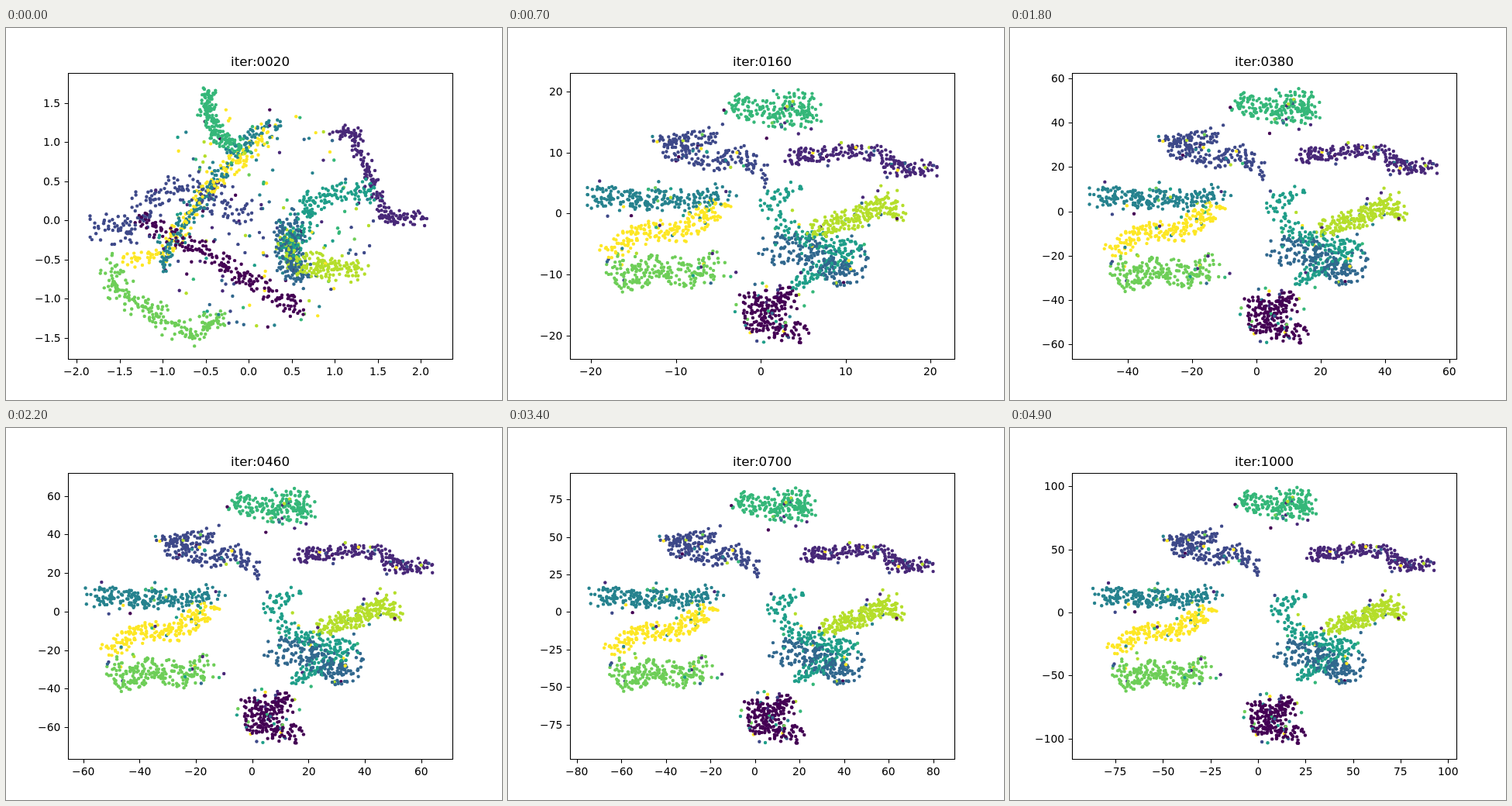
An HTML page that plays this animation: 640 by 480 pixels, repeating every 5 s.

```html
<!DOCTYPE html>
<html lang="en">
<head>
<meta charset="utf-8">
<title>Embedding</title>
<style>
html, body { margin: 0; width: 100%; height: 100%; overflow: hidden; background: #fff; }
svg { display: block; width: 640px; height: 480px; }
text { font: 13.89px "DejaVu Sans", sans-serif; fill: #000; }
#title { font-size: 16.67px; text-anchor: middle; }
#axes path { fill: none; stroke: #000; stroke-width: 1.11; }
</style>
</head>
<body>
<svg viewBox="0 0 640 480">
  <g id="dots"></g>
  <g id="axes">
    <path d="M80.5 58.5H576.5V427.5H80.5Z"/>
    <path id="ticks"/>
    <g id="labels"></g>
  </g>
  <text id="title" x="328" y="49"></text>
</svg>
<script>
const STEP_MS = 100, STEPS = 50, PER_CLASS = 220, STRAY = 0.07;
const SETTLED = 160, LAST = 1000;
const BOX = { left: 80, right: 576, top: 57.6, bottom: 427.2 };
const CENTRE = [328, 242];
const NS = "http://www.w3.org/2000/svg";
const $ = id => document.getElementById(id);

// Each class is a cloud of radius w around a spine: first scattered, then settled.
const cloud = (w, ...spine) => ({ w, spine });
const classes = [
  { color: "#440154",
    start: cloud(15, [168, 240], [220, 272], [325, 330], [380, 366]),
    end: cloud(13, [308, 366], [364, 359], [322, 384], [372, 398]) },
  { color: "#482878",
    start: cloud(11, [425, 134], [448, 135], [490, 245], [545, 246]),
    end: cloud(9, [385, 164], [455, 157], [488, 160], [497, 176], [546, 179]) },
  { color: "#3e4989",
    start: cloud(24, [115, 257], [165, 265], [190, 215], [250, 205], [320, 250]),
    end: cloud(11, [264, 137], [206, 150], [265, 170], [288, 156], [322, 182]) },
  { color: "#31688e",
    start: cloud(21, [366, 250], [367, 305], [382, 325]),
    end: cloud(17, [352, 290], [390, 290], [432, 318], [450, 302]) },
  { color: "#26828e",
    start: cloud(16, [205, 315], [205, 290], [295, 155], [355, 126]),
    end: cloud(13, [115, 217], [200, 222], [235, 222], [260, 212]) },
  { color: "#1f9e89",
    start: cloud(18, [367, 250], [364, 300], [400, 215], [478, 209]),
    end: cloud(11, [380, 214], [345, 232], [372, 266], [440, 285], [374, 320]) },
  { color: "#35b779",
    start: cloud(13, [262, 84], [258, 105], [275, 140], [305, 156]),
    end: cloud(13, [294, 90], [330, 100], [370, 87], [388, 104], [345, 110]) },
  { color: "#6ece58",
    start: cloud(20, [136, 305], [138, 330], [190, 370], [250, 397], [280, 365]),
    end: cloud(16, [143, 308], [155, 328], [195, 310], [215, 322], [256, 308]) },
  { color: "#b5de2b",
    start: cloud(18, [362, 275], [378, 305], [430, 310], [455, 312]),
    end: cloud(12, [413, 256], [455, 246], [488, 228], [502, 240]) },
  { color: "#fde725",
    start: cloud(15, [155, 302], [205, 288], [255, 215], [340, 132]),
    end: cloud(13, [136, 282], [170, 265], [215, 262], [258, 236]) }
];

// Iteration, then the axis limits: x min, x max, y min, y max.
const limits = [
  [20, -2.1, 2.365, -1.77, 1.89],
  [100, -2.9, 3, -3, 2.9],
  [160, -22.47, 22.83, -23.9, 23.1],
  [380, -57.35, 62.2, -66.7, 62.6],
  [560, -73.8, 80.3, -86.7, 81.8],
  [1000, -97.8, 104.3, -116.1, 110.7]
];

let seed = 20731;
function rand() {
  seed = (seed + 0x6D2B79F5) | 0;
  let v = Math.imul(seed ^ (seed >>> 15), 1 | seed);
  v = (v + Math.imul(v ^ (v >>> 7), 61 | v)) ^ v;
  return ((v ^ (v >>> 14)) >>> 0) / 4294967296;
}

const mix = (a, b, u) => a + (b - a) * u;
const mixPoint = (p, q, u) => [mix(p[0], q[0], u), mix(p[1], q[1], u)];
const logPart = (it, from, to) => Math.log(it / from) / Math.log(to / from);
const clamp = (v, lo, hi) => Math.min(hi, Math.max(lo, v));
const snap = v => Math.floor(v + 0.5) + 0.5;

function along(spine, share) {
  const lengths = spine.slice(1).map((p, i) => Math.hypot(p[0] - spine[i][0], p[1] - spine[i][1]));
  let left = share * lengths.reduce((a, b) => a + b);
  let i = 0;
  while (i < lengths.length - 1 && left > lengths[i]) left -= lengths[i++];
  return mixPoint(spine[i], spine[i + 1], left / lengths[i]);
}

function around([x, y], radius) {
  const a = rand() * 2 * Math.PI;
  return [x + radius * Math.cos(a), y + radius * Math.sin(a)];
}

function middle(spine) {
  const mean = j => spine.reduce((sum, p) => sum + p[j], 0) / spine.length;
  return [mean(0), mean(1)];
}

// Clusters tighten by a sixth while their middles drift apart.
function loosen(p, mid) {
  const early = mixPoint(mid, CENTRE, 0.05);
  return [0, 1].map(j => early[j] + 1.2 * (p[j] - mid[j]));
}

function add(parent, name, attrs) {
  const el = document.createElementNS(NS, name);
  for (const key in attrs) el.setAttribute(key, attrs[key]);
  return parent.appendChild(el);
}

function makePoint(own) {
  const stray = rand() < STRAY, share = rand();
  const { w, spine } = (stray ? classes[Math.floor(rand() * classes.length)] : own).end;
  const first = stray
    ? around(CENTRE, 150 * Math.sqrt(rand()))
    : around(along(own.start.spine, share), own.start.w * rand());
  const last = around(along(spine, share), w * Math.sqrt(rand()) * (stray ? 1.8 : 1));
  return {
    el: add($("dots"), "circle", { r: 2.2, fill: own.color }),
    first, last, settled: loosen(last, middle(spine))
  };
}

const points = [];
for (let i = 0; i < PER_CLASS; i++) points.push(...classes.map(makePoint));

function place({ first, settled, last }, it) {
  if (it > SETTLED) return mixPoint(settled, last, logPart(it, SETTLED, LAST));
  const decay = n => 1 - Math.exp(-n / 40);
  return mixPoint(first, settled, decay(it - 20) / decay(SETTLED - 20));
}

function limitsAt(it) {
  const k = Math.max(1, limits.findIndex(row => it <= row[0]));
  const a = limits[k - 1], b = limits[k], u = logPart(it, a[0], b[0]);
  return a.slice(1).map((v, j) => mix(v, b[j + 1], u));
}

// Round steps giving at most nine intervals.
function tickValues(lo, hi) {
  const raw = (hi - lo) / 9, unit = 10 ** Math.floor(Math.log10(raw));
  const step = unit * [1, 2, 2.5, 5, 10].find(s => s * unit >= raw);
  const digits = Number.isInteger(step) ? 0 : 1;
  const out = [];
  for (let k = Math.ceil(lo / step); k * step <= hi; k++) {
    const value = k * step;
    out.push({ value, text: (value < 0 ? "\u2212" : "") + Math.abs(value).toFixed(digits) });
  }
  return out;
}

// Labels start on whole pixels; align is the share of the width left of x.
function label(text, x, y, align) {
  const el = add($("labels"), "text", { y: Math.round(y) });
  el.textContent = text;
  el.setAttribute("x", Math.round(x - align * el.getComputedTextLength()));
}

function drawAxes(it) {
  const [x0, x1, y0, y1] = limitsAt(it);
  let d = "";
  $("labels").replaceChildren();
  for (const { value, text } of tickValues(x0, x1)) {
    const x = mix(BOX.left, BOX.right, (value - x0) / (x1 - x0));
    d += `M${snap(x)} 427.5v4.9`;
    label(text, x, 448, 0.5);
  }
  for (const { value, text } of tickValues(y0, y1)) {
    const y = mix(BOX.bottom, BOX.top, (value - y0) / (y1 - y0));
    d += `M80.5 ${snap(y)}h-4.9`;
    label(text, 70.3, y + 5, 1);
  }
  $("ticks").setAttribute("d", d);
}

function draw(step) {
  const it = 20 * (step + 1);
  $("title").textContent = "iter:" + String(it).padStart(4, "0");
  drawAxes(it);
  for (const point of points) {
    const [x, y] = place(point, it);
    point.el.setAttribute("cx", clamp(x, 102.5, 553.5).toFixed(2));
    point.el.setAttribute("cy", clamp(y, 74.4, 410.4).toFixed(2));
  }
}

let shown = 0, origin = null;
function tick(now) {
  origin ??= now;
  const step = Math.floor((now - origin) / STEP_MS) % STEPS;
  if (step !== shown) draw(shown = step);
  requestAnimationFrame(tick);
}
draw(0);
requestAnimationFrame(tick);
</script>
</body>
</html>
```
